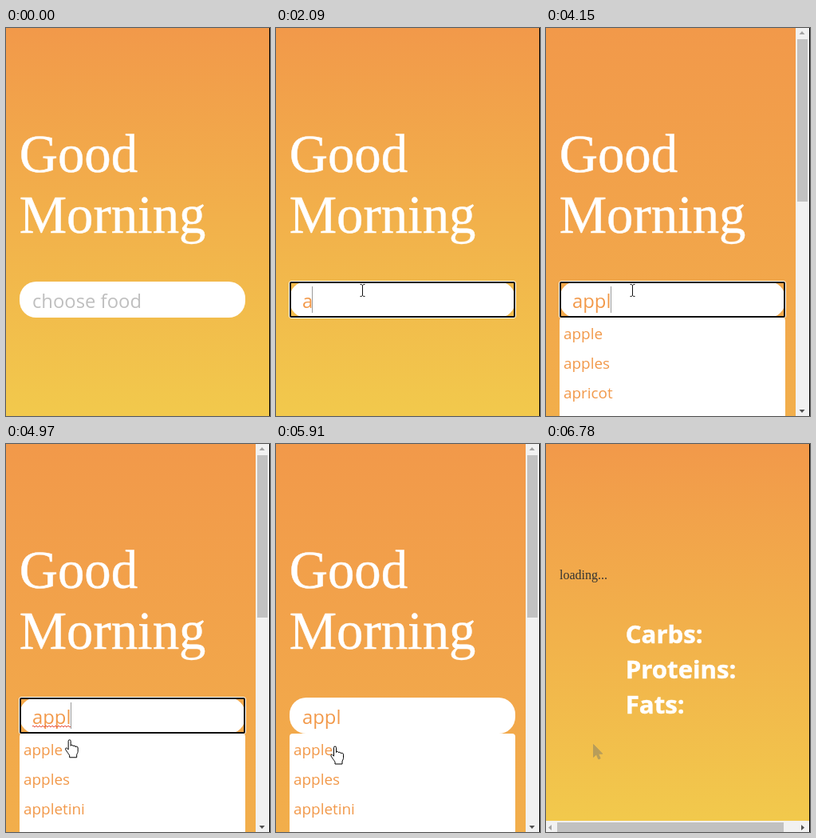
Recreate the animation shown at these times as an HTML page. Size 331 by 485 pixels, loop 8 s.

```html
<!DOCTYPE html>
<html lang="en">
<head>
<meta charset="utf-8">
<title>Good Morning</title>
<style>
html, body { margin: 0; width: 100%; height: 100%; overflow: hidden; }
svg { display: block; width: 331px; height: 485px; }
text { font-family: "Open Sans", "Noto Sans", sans-serif; fill: #f2994a; white-space: pre; }
.serif { font-family: "Liberation Serif", "Times New Roman", serif; }
.title { font-size: 66.8px; fill: #fff; stroke: #fff; stroke-width: .5; }
.field { font-size: 23.8px; }
.item { font-size: 18.9px; }
.bold { font-size: 31.2px; font-weight: 700; fill: #fff; stroke: #fff; stroke-width: .5; }
.pointer { fill: #fff; stroke: #000; stroke-linejoin: round; }
</style>
</head>
<body>
<svg viewBox="0 0 331 485">
  <defs>
    <linearGradient id="sky" x2="0" y2="1">
      <stop stop-color="#f2994a"/><stop offset="1" stop-color="#f2c94c"/>
    </linearGradient>
    <path id="arrowShape" d="M0 0v16l3.7-3.5 2.6 6 2.4-1-2.6-5.8h5.2z"/>
  </defs>
  <rect id="page" width="331" fill="url(#sky)"/>

  <g id="form">
    <text class="serif title" x="16.7" y="180">Good</text>
    <text class="serif title" x="16.7" y="256">Morning</text>
    <g id="list">
      <path d="M17 485V366q0-4 4-4H296q4 0 4 4V485z" fill="#fff"/>
      <text class="item" x="22" y="389">apple</text>
      <text class="item" x="22" y="426">apples</text>
      <text class="item" x="22" y="463" id="third"></text>
    </g>
    <rect x="17" y="317" width="283" height="45" rx="20.8" fill="#fff"/>
    <g id="focus" fill="none">
      <rect x="16.5" y="316.5" width="284" height="46" rx="2.5" stroke="#fff"/>
      <rect x="18" y="318" width="281" height="43" rx="1.5" stroke="#101010" stroke-width="2"/>
    </g>
    <text class="field" x="33" y="350" id="hint" style="fill:#bfbfbf">choose food</text>
    <text class="field" x="33" y="350" id="typed"></text>
    <path id="squiggle" d="M33 353q1-2 2 0t2 0 2 0 2 0 2 0 2 0 2 0 2 0 2 0 2 0 2 0 2 0 2 0 2 0 2 0 2 0 2 0 2 0 2 0 2 0 2 0 2 0 2 0 2 0" fill="none" stroke="#e8503a"/>
    <rect id="caret" y="323" width="1" height="33" fill="#9a9a9a"/>
  </g>

  <g id="vbar">
    <rect x="313" width="17" height="485" fill="#f1f1f1"/>
    <rect x="315" y="14" width="13" height="203" fill="#c1c1c1"/>
    <path d="M317.5 8h7l-3.5-4z" fill="#a3a3a3"/>
    <path d="M317.5 477h7l-3.5 4z" fill="#505050"/>
  </g>

  <g id="result">
    <text class="serif" x="17" y="169" font-size="16" style="fill:#333">loading...</text>
    <text class="bold" x="99.7" y="249">Carbs:</text>
    <text class="bold" x="99.7" y="293">Proteins:</text>
    <text class="bold" x="99.7" y="337">Fats:</text>
    <rect y="471" width="330" height="14" fill="#f1f1f1"/>
    <rect x="14" y="473" width="284" height="12" fill="#c1c1c1"/>
    <path d="M7 476v7l-4-3.5z" fill="#a3a3a3"/>
    <path d="M320 476v7l4-3.5z" fill="#505050"/>
    <use href="#arrowShape" id="trail" x="59.5" y="375.500" fill="#807c68" stroke="#807c68" opacity=".5"/>
  </g>

  <rect x="330" width="1" height="485"/>
  <circle id="ring" r="14" fill="#ffe94a" opacity=".45"/>
  <g id="cursor">
    <use href="#arrowShape" id="arrow" class="pointer"/>
    <path id="beam" d="M-3-7.5q2.5 0 3 1 .5-1 3-1M0-6.5v13M-3 7.5q2.5 0 3-1 .5 1 3 1" fill="none" stroke="#111"/>
    <path id="hand" class="pointer" d="M-1.5 1.5a1.5 1.5 0 0 1 3 0v6c0-1.5 3-1.5 3 .5c0-1.3 3-1 3 1c0-1.3 3-1 3 1.2v4.3c0 2-1.5 3-1.5 4.5v3h-9v-2.5c-1-2-4.5-6-5-7.5-.8-2 1.5-2.2 2.5-1l1 1.2z"/>
  </g>
</svg>
<script>
const LOOP = 8000, STEP = 70;
const $ = id => document.getElementById(id);
const show = (id, on) => $(id).setAttribute('display', on ? 'inline' : 'none');
const within = (t, ...spans) => spans.some(([a, b]) => t >= a && t < b);
const carets = [33, 45, 60, 75, 81];

// Stepped progress: the pointer is sampled every STEP ms
const progress = (t, start, steps) =>
  Math.min(1, Math.floor((t - start + 5) / STEP) / steps);

function pointer(t) {
  if (t < 500) return null;
  if (t < 4550) {
    const p = 1 - (1 - progress(t, 500, 3)) ** 2;
    return ['beam', 9.5 + 99 * p, 335 - 7 * p];
  }
  if (t < 5980) {
    const p = 1 - (1 - progress(t, 4480, 10)) ** 1.5;
    const y = 328 + 50 * p;
    return [y > 362 ? 'hand' : 'beam', 108.5 - 34.5 * p, y];
  }
  if (t < 6570) return ['arrow', 72, 378];
  if (t < 6780) {
    const p = progress(t, 6570, 2);
    return ['arrow', 59 - 52 * p, 375 - 19 * p];
  }
  return null;
}

function render(t) {
  const result = t >= 5980, open = t >= 4150 && !result;
  const count = [2090, 2160, 2360, 2490].filter(at => t >= at).length;

  $('page').setAttribute('height', result ? 471 : open ? 1092 : 485);
  show('form', !result);
  show('result', result);
  show('list', open);
  show('vbar', open);
  $('third').textContent = t < 4220 ? 'apricot' : 'appletini';

  show('hint', !count);
  $('typed').textContent = 'appl'.slice(0, count);
  show('focus', within(t, [980, 5770]));
  show('squiggle', within(t, [4290, 5770]));
  $('caret').setAttribute('x', carets[count]);
  show('caret', within(t, [980, 1630], [2090, 3020], [3550, 4220], [4620, 5170], [5700, 5770]));

  const at = pointer(t);
  show('cursor', at);
  show('ring', within(t, [910, 1110], [5700, 5910]));
  show('trail', t >= 6640);
  if (at) {
    const [shape, x, y] = at;
    for (const id of ['arrow', 'beam', 'hand']) show(id, id === shape);
    const move = `translate(${x} ${y})`;
    $('cursor').setAttribute('transform', move);
    $('ring').setAttribute('transform', move);
  }
}

const start = performance.now();
function tick() {
  render((performance.now() - start) % LOOP);
  requestAnimationFrame(tick);
}
tick();
</script>
</body>
</html>
```
